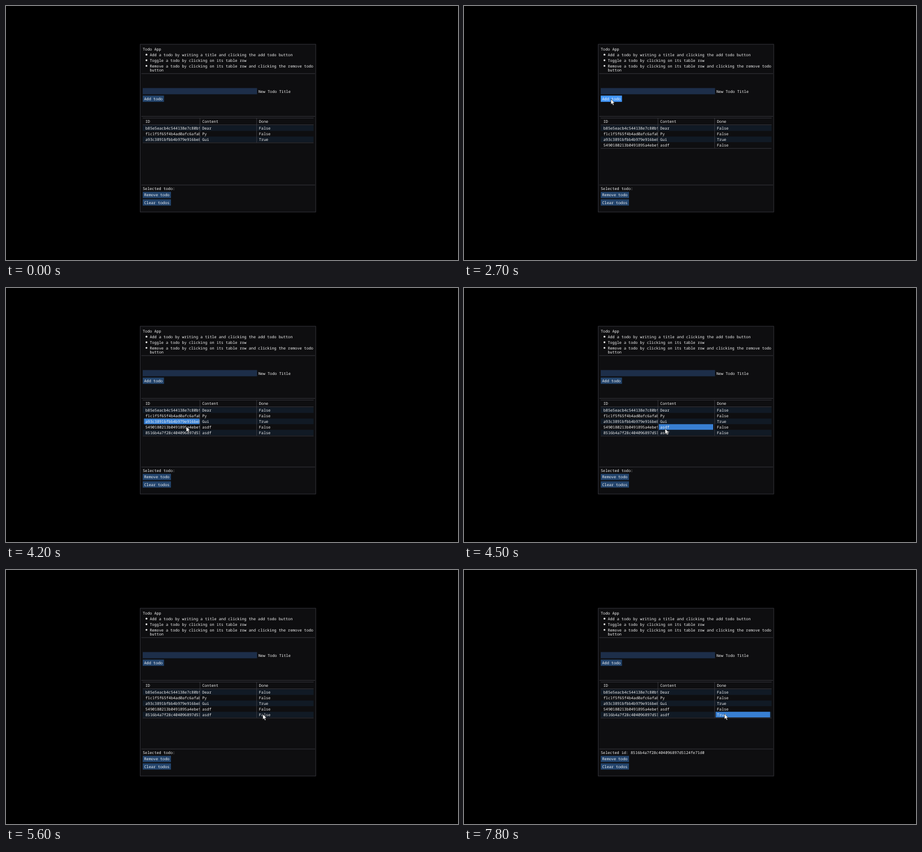
An HTML page for the animation above (8 s loop, 800 by 450 pixels).

```html
<!DOCTYPE html>
<html lang="en">
<head>
<meta charset="utf-8">
<title>Todo App</title>
<style>
  html, body { margin: 0; width: 100%; height: 100%; overflow: hidden; background: #000; }
  svg { display: block; width: 800px; height: 450px; }
  text {
    font: 6.805px "Noto Sans Mono", "DejaVu Sans Mono", monospace;
    fill: #f4f4f4;
    white-space: pre;
    text-rendering: geometricPrecision;
  }
</style>
</head>
<body>
<svg id="stage" viewBox="0 0 800 450" xmlns="http://www.w3.org/2000/svg">
  <defs><clipPath id="idClip"><rect x="242" y="198" width="100.8" height="70"/></clipPath></defs>
</svg>
<script>
const LOOP = 8000, TICK = 100;
const EDGE = '#3c3c44', FIELD = '#1d2e49', BUTTON = '#23446c';
const HOVER = '#4296fa', PRESSED = '#0f87fa', CELL_HOVER = '#387fd2';
const stage = document.getElementById('stage');

function add(tag, attrs, parent = stage) {
  const el = document.createElementNS('http://www.w3.org/2000/svg', tag);
  for (const key in attrs) el.setAttribute(key, attrs[key]);
  return parent.appendChild(el);
}
const rect = (x, y, width, height, fill, parent) => add('rect', { x, y, width, height, fill }, parent);
const hline = (x1, x2, y) => rect(x1, y, x2 - x1, 0.8, EDGE);
function label(x, middle, value, parent) {
  const el = add('text', { x, y: middle + 2.5 }, parent);
  el.textContent = value;
  return el;
}
const show = (el, on) => el.setAttribute('visibility', on ? 'visible' : 'hidden');
const inside = (p, b) => p.x >= b.x && p.x < b.x + b.w && p.y >= b.y && p.y < b.y + b.h;

// Window and intro
add('rect', { x: 237.6, y: 67.8, width: 310.6, height: 297.2, fill: '#0e0e10', stroke: EDGE, 'stroke-width': 0.8 });
label(242, 76.3, 'Todo App');
[
  'Add a todo by writing a title and clicking the add todo button',
  'Toggle a todo by clicking on its table row',
  'Remove a todo by clicking on its table row and clicking the remove todo'
].forEach((line, i) => {
  const y = 86.4 + i * 9.9;
  add('circle', { cx: 248.6, cy: y - 0.2, r: 1.6, fill: '#f4f4f4' });
  label(254.4, y, line);
});
label(254.4, 113.9, 'button');
[119.4, 195, 316.7].forEach(y => hline(239.5, 547, y));

// Input
const field = { x: 242, y: 145.4, w: 202.4, h: 11 };
rect(field.x, field.y, field.w, field.h, FIELD);
label(446.7, 151, 'New Todo Title');
const typed = label(244.6, 151, '');
const caret = rect(0, 147, 0.7, 8, '#f4f4f4');

// Buttons
function makeButton(y, w, title) {
  const box = { x: 242, y, w, h: 11.1 };
  const el = rect(box.x, y, w, box.h, BUTTON);
  label(244.5, y + 5.7, title);
  return { box, el };
}
const buttons = [
  makeButton(158.7, 37.6, 'Add todo'),
  makeButton(329.2, 50, 'Remove todo'),
  makeButton(342.5, 50, 'Clear todos')
];

// Table
const columns = [
  { x: 244.4, w: 98.2, text: 246.8 },
  { x: 344.8, w: 96.2, text: 347.2 },
  { x: 445.4, w: 96.4, text: 447.8 }
];
const todos = [
  ['b85e5eacb4c544138e7c80bf', 'Dear', 'False'],
  ['f1c1f5f65f4b4ad0afc6afab', 'Py', 'False'],
  ['a93c3891bfbb4b979e916be8', 'Gui', 'True'],
  ['5490180213b0491895a4ebef', 'asdf', 'False'],
  ['8516b4a7f28c404096897d5124fe71d0', 'asdf', 'False']
];
const rowY = i => 211.4 + i * 9.95;
hline(242, 544.4, 198.2);
const rows = todos.map((values, i) => {
  const group = add('g', {});
  if (i % 2 === 0) rect(242, rowY(i), 302.4, 9.95, '#111a25', group);
  return group;
});
const highlight = rect(0, 0, 0, 9.95, CELL_HOVER);
['ID', 'Content', 'Done'].forEach((title, c) => label(columns[c].text, 204.3, title));
const cells = todos.map((values, i) => values.map((value, c) => {
  const holder = add('g', c === 0 ? { 'clip-path': 'url(#idClip)' } : {}, stage);
  return label(columns[c].text, rowY(i) + 4.9, value, holder);
}));
hline(242, 544.4, 210.2);
const bottomLine = hline(242, 544.4, 0);
const dividers = [342.8, 443.3].map(x => rect(x, 198.4, 0.8, 0, EDGE));

const selected = label(242, 323.2, '');

// Pointers, both with their hot spot at 0,0
const arrow = add('path', {
  d: 'M0 0V9.4L2.2 7.4L3.8 10.9L5.4 10.2L3.9 6.8H6.9Z',
  fill: '#fff', stroke: '#000', 'stroke-width': 0.6
});
const beam = add('path', {
  d: 'M-2.4 -4.2H-.7L0 -3.6L.7 -4.2H2.4M0 -3.6V3.8M-2.4 4.4H-.7L0 3.8L.7 4.4H2.4',
  fill: 'none', stroke: '#e8e8e8', 'stroke-width': 0.8
});

// Pointer path: time, x, y
const path = [
  [1000, 290, 157.4], [1100, 303, 151.2], [2200, 303, 151.2], [2300, 293, 154],
  [2500, 262, 164.5], [2700, 260, 165], [2800, 264, 161], [2900, 287, 152],
  [3500, 287, 152], [3700, 266, 163], [3900, 265, 164], [4000, 282, 192],
  [4100, 308, 235], [4200, 319, 245.6], [4300, 336, 247], [4400, 352, 248],
  [4700, 363.6, 252], [5300, 364, 252], [5400, 388, 253], [5500, 444, 255],
  [5700, 465, 256], [6300, 465, 256], [6400, 464, 256], [6700, 464, 256],
  [7000, 462.5, 255.4], [7600, 462.5, 255.4], [7800, 461, 255]
];
function pointerAt(t) {
  if (t < path[0][0]) return null;
  const next = path.findIndex(k => k[0] > t);
  const [bt, bx, by] = next < 0 ? path[path.length - 1] : path[next];
  if (next < 0) return { x: bx, y: by };
  const [at, ax, ay] = path[next - 1];
  const f = (t - at) / (bt - at);
  return { x: ax + (bx - ax) * f, y: ay + (by - ay) * f };
}

const presses = [2600, 3800, 5000, 5800];
const typing = [{ focus: 1200, start: 1900, end: 2700 }, { focus: 3000, start: 3200, end: 3900 }];

function drawInput(t) {
  const run = typing.find(r => t >= r.focus && t < r.end);
  const count = run && t >= run.start ? Math.min(4, (t - run.start) / TICK + 1) : 0;
  typed.textContent = 'asdf'.slice(0, count);
  caret.setAttribute('x', 244.8 + count * 4.083);
  show(caret, run && !presses.some(p => t >= p && t < run.end));
}

function drawTable(t) {
  const count = 3 + (t >= 2700) + (t >= 3900);
  rows.forEach((row, i) => show(row, i < count));
  cells.forEach((row, i) => row.forEach(cell => show(cell, i < count)));
  const end = rowY(count) + 0.6;
  bottomLine.setAttribute('y', end);
  dividers.forEach(d => d.setAttribute('height', end - 198.4));
  const toggled = t >= 5900;
  cells[4][2].textContent = toggled ? 'True' : 'False';
  selected.textContent = toggled ? 'Selected id: ' + todos[4][0] : 'Selected todo:';
  return count;
}

function drawHover(t, count) {
  // Highlights trail the pointer by one tick
  const p = pointerAt(t - TICK) || { x: -1, y: -1 };
  const down = presses.includes(t);
  for (const { box, el } of buttons) {
    el.setAttribute('fill', inside(p, box) ? (down ? PRESSED : HOVER) : BUTTON);
  }
  const r = Math.floor((p.y - rowY(0)) / 9.95);
  const col = columns.find(c => p.x >= c.x && p.x < c.x + c.w);
  const on = col && r >= 0 && r < count;
  show(highlight, on);
  if (!on) return;
  highlight.setAttribute('x', col.x);
  highlight.setAttribute('y', rowY(r));
  highlight.setAttribute('width', col.w);
  highlight.setAttribute('fill', down ? HOVER : CELL_HOVER);
}

function drawPointer(t) {
  const p = pointerAt(t);
  const overField = p && inside(p, field);
  show(arrow, p && !overField);
  show(beam, overField);
  if (p) (overField ? beam : arrow).setAttribute('transform', `translate(${p.x} ${p.y})`);
}

function draw(time) {
  const t = Math.floor((time % LOOP) / TICK) * TICK;
  drawInput(t);
  drawHover(t, drawTable(t));
  drawPointer(t);
}

let began;
function frame(now) {
  began ??= now;
  draw(now - began);
  requestAnimationFrame(frame);
}
draw(0);
requestAnimationFrame(frame);
</script>
</body>
</html>
```
